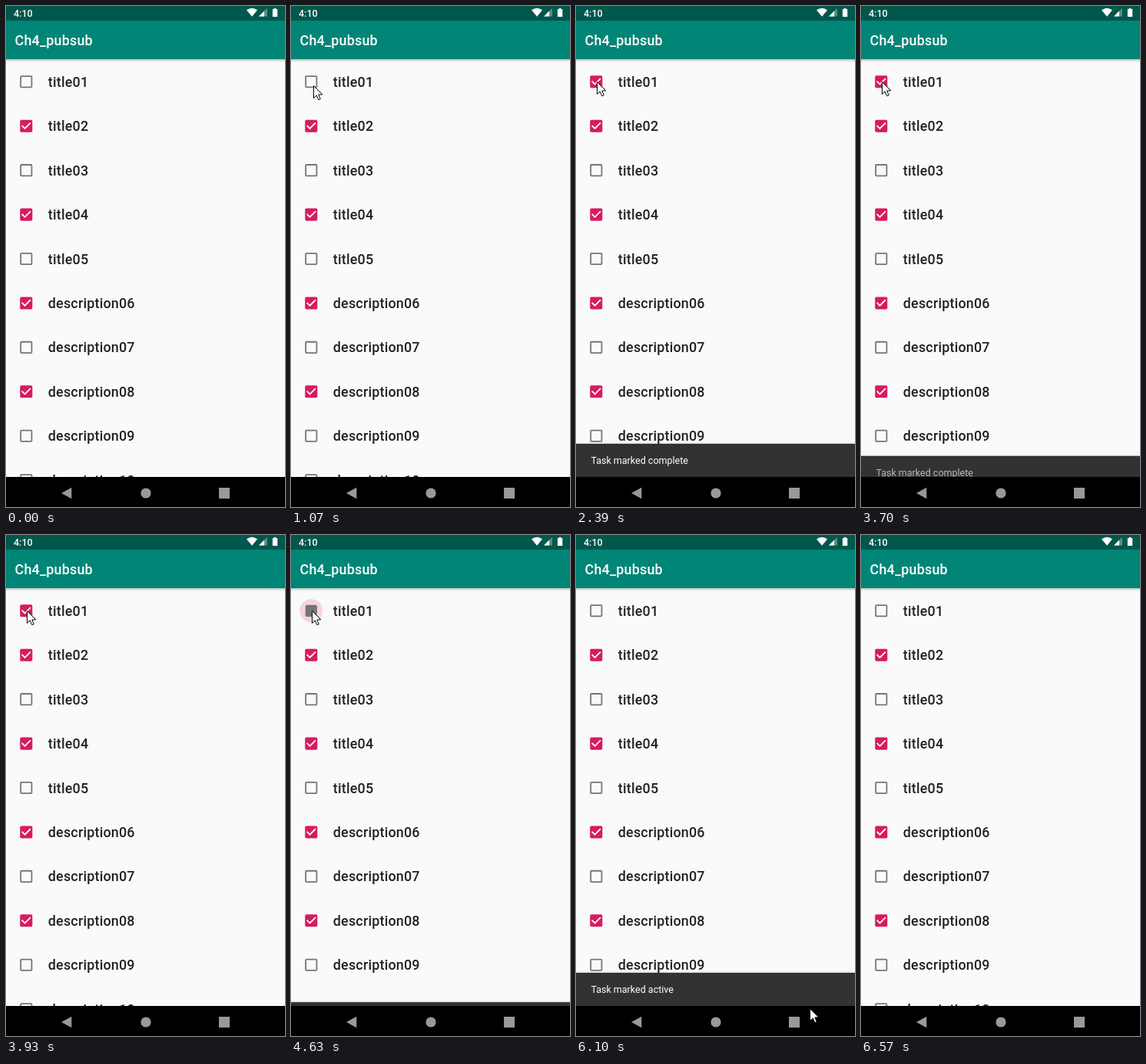
Recreate the animation shown at these times as an HTML page with a canvas. Size 363 by 650 pixels, loop 7.5 s.

```html
<!DOCTYPE html>
<html lang="en">
<head>
<meta charset="utf-8">
<title>Task list</title>
<style>
html, body { margin: 0; width: 100%; height: 100%; overflow: hidden; background: #fafafa; }
canvas { display: block; }
</style>
</head>
<body>
<canvas id="stage" width="363" height="650"></canvas>
<script>
const ctx = document.getElementById('stage').getContext('2d');
const LOOP = 7500, W = 363, NAV = 611;
const PINK = [216, 27, 96], GREY = [117, 117, 117];
const ROW0 = 98.3, PITCH = 57.43, BOX_X = 26.3, UNIT = 0.893;
const CHECK_AT = 1825, UNCHECK_AT = 4568;

// Bursts of screen updates: start, end, number of updates.
const bursts = [
  [140, 370, 4], [690, 1300, 9], [1530, 1610, 2], [1840, 2390, 8],
  [3700, 3930, 4], [4410, 5020, 9], [5630, 6170, 8], [6340, 6570, 4]
];

// Pointer paths: visible from, visible until, then [time, x, y] points.
const pointerPaths = [
  [140, 370, [[140, 250, 615], [217, 186, 410], [293, 103, 179]]],
  [690, 6170, [
    [690, 45, 21], [843, 39, 62], [995, 31, 97], [1071, 29, 103], [1147, 26, 99],
    [1300, 19, 90], [1450, 19, 90], [1610, 27, 98], [5560, 27, 98],
    [5707, 47, 130], [5861, 122, 268], [6015, 237, 488], [6093, 304, 614]
  ]]
];

const snacks = [
  ['Task marked complete', 1825, 3625],
  ['Task marked active', 4592, 6265]
];

const clamp = v => Math.max(0, Math.min(1, v));
const ramp = (t, a, b) => clamp((t - a) / (b - a));
const lerp = (a, b, p) => a + (b - a) * p;
const mix = (a, b, p) => `rgb(${a.map((v, i) => Math.round(lerp(v, b[i], p)))})`;

// Cubic bezier (.4, 0, .2, 1)
function ease(x) {
  if (x <= 0 || x >= 1) return clamp(x);
  let lo = 0, hi = 1, s = 0.5;
  for (let i = 0; i < 20; i++) {
    s = (lo + hi) / 2;
    const bx = 1.2 * s * (1 - s) ** 2 + 0.6 * s * s * (1 - s) + s ** 3;
    if (bx < x) lo = s; else hi = s;
  }
  return 3 * s * s * (1 - s) + s ** 3;
}

// Time of the latest screen update.
function held(t) {
  let out = 0;
  for (const [start, end, n] of bursts) {
    if (t < start) break;
    const step = (end - start) / (n - 1);
    const k = Math.min(n - 1, Math.floor((t - start + 9) / step));
    out = start + k * step;
  }
  return out;
}

function rect(x, y, w, h, color) {
  ctx.fillStyle = color;
  ctx.fillRect(x, y, w, h);
}

function disc(x, y, r, color) {
  ctx.fillStyle = color;
  ctx.beginPath();
  ctx.arc(x, y, r, 0, 2 * Math.PI);
  ctx.fill();
}

function poly(points, color) {
  ctx.beginPath();
  points.forEach(([x, y]) => ctx.lineTo(x, y));
  ctx.closePath();
  ctx.fillStyle = color;
  ctx.fill();
}

function text(str, x, y, size, weight, color, spacing = 0) {
  ctx.font = `${weight} ${size}px Roboto, sans-serif`;
  ctx.letterSpacing = spacing + 'px';
  ctx.fillStyle = color;
  ctx.fillText(str, x, y);
}

// open: size of the hollow, mark: size of the tick
function checkbox(y, color, open, mark, scale = 1) {
  ctx.save();
  ctx.translate(BOX_X, y);
  ctx.scale(UNIT * scale, UNIT * scale);
  ctx.fillStyle = color;
  ctx.beginPath();
  ctx.roundRect(-9, -9, 18, 18, 2);
  if (open > 0) ctx.rect(-7 * open, -7 * open, 14 * open, 14 * open);
  ctx.fill('evenodd');
  if (mark > 0) {
    ctx.scale(mark, mark);
    ctx.beginPath();
    ctx.moveTo(-6.3, -0.7);
    ctx.lineTo(-2, 3.6);
    ctx.lineTo(6.3, -4.7);
    ctx.strokeStyle = '#fff';
    ctx.lineWidth = 2;
    ctx.stroke();
  }
  ctx.restore();
}

function firstBox(t) {
  const on = t - CHECK_AT, off = t - UNCHECK_AT;
  const dip = p => 1 - 0.09 * Math.sin(Math.PI * clamp(p / 340));
  if (off >= 0) {
    checkbox(ROW0, mix(PINK, GREY, ramp(off, 0, 60)),
      ease(ramp(off, 90, 300)), 1 - 0.9 * ramp(off, 0, 70) - 0.1 * ramp(off, 70, 110), dip(off));
  } else {
    checkbox(ROW0, mix(GREY, PINK, ramp(on, 20, 120)),
      1 - ease(ramp(on, 0, 150)), ease(ramp(on, 175, 370)), dip(on));
  }
}

function ripples(t) {
  if (t >= 1840 && t < 2390) {
    const r = lerp(6, 18, ramp(t, 1825, 1985));
    disc(BOX_X, ROW0, r, `rgba(0,0,0,${0.11 * (1 - ramp(t, 2060, 2390))})`);
  }
  if (t >= 4410 && t < 5020) {
    const r = lerp(5, 18, ramp(t, 4400, 4710));
    disc(BOX_X, ROW0, r, `rgba(216,27,96,${0.16 * (1 - ramp(t, 4700, 5000))})`);
  }
}

function list(t) {
  ripples(t);
  for (let i = 0; i < 10; i++) {
    const y = ROW0 + i * PITCH;
    const label = (i < 5 ? 'title' : 'description') + String(i + 1).padStart(2, '0');
    if (i === 0) firstBox(t);
    else if ([1, 3, 5, 7].includes(i)) checkbox(y, mix(PINK, PINK, 0), 0, 1);
    else checkbox(y, mix(GREY, GREY, 0), 1, 0);
    text(label, 54.8, y + 6.6, 17.86, 500, '#212121', 0.22);
  }
}

function bars() {
  rect(0, 0, W, 19, '#00574b');
  rect(0, 19, W, 50, '#008577');
  const shade = ctx.createLinearGradient(0, 69, 0, 73);
  shade.addColorStop(0, 'rgba(0,0,0,.22)');
  shade.addColorStop(1, 'rgba(0,0,0,0)');
  rect(0, 69, W, 4, shade);
  text('4:10', 10, 13.6, 12.5, 500, '#fff');
  text('Ch4_pubsub', 11.6, 51, 17.86, 500, '#fff', 0.22);

  ctx.fillStyle = '#fff';
  ctx.beginPath();
  ctx.moveTo(320, 13.8);
  ctx.lineTo(313, 5.2);
  ctx.quadraticCurveTo(320, 0.2, 327, 5.2);
  ctx.fill();
  poly([[329, 13.5], [339.8, 13.5], [339.8, 2.8]], 'rgba(255,255,255,.35)');
  poly([[329, 13.5], [336, 13.5], [336, 6.6]], '#fff');
  rect(346.8, 4, 6.4, 10, '#fff');
  rect(348.7, 2.8, 2.6, 1.4, '#fff');
}

function snackbar(t) {
  for (const [msg, show, hide] of snacks) {
    const leave = ease(ramp(t, hide, hide + 250));
    if (t < show || leave >= 1) continue;
    const top = NAV - 43 * (ease(ramp(t, show, show + 250)) - leave);
    ctx.save();
    ctx.shadowColor = 'rgba(0,0,0,.3)';
    ctx.shadowBlur = 3;
    rect(0, top, W, 50, '#323232');
    ctx.restore();
    const alpha = ramp(t, show + 95, show + 250) * (1 - ramp(t, hide, hide + 215));
    text(msg, 19.4, top + 26.3, 12.5, 400, `rgba(255,255,255,${alpha})`);
  }
}

function navbar() {
  rect(0, NAV, W, 39, '#000');
  poly([[72, 632], [85.3, 624.7], [85.3, 639.3]], '#999');
  disc(182, 632, 6.6, '#999');
  rect(277, 625, 14, 14, '#999');
}

function pointer(t) {
  for (const [from, until, pts] of pointerPaths) {
    if (t < from || t >= until) continue;
    let i = 1;
    while (i < pts.length - 1 && t > pts[i][0]) i++;
    const a = pts[i - 1], b = pts[i], p = ramp(t, a[0], b[0]);
    ctx.save();
    ctx.translate(Math.round(lerp(a[1], b[1], p)) + 0.5, Math.round(lerp(a[2], b[2], p)) + 0.5);
    poly([[0, 0], [0, 16], [3.7, 12.4], [6.3, 18.2], [8.8, 17.2], [6.3, 11.5], [11.3, 11.3]], '#fff');
    ctx.strokeStyle = '#000';
    ctx.lineWidth = 1;
    ctx.stroke();
    ctx.restore();
  }
}

function draw(t) {
  rect(0, 0, W, 650, '#fafafa');
  list(t);
  bars();
  snackbar(t);
  navbar();
  pointer(t);
}

const origin = performance.now();
function tick() {
  draw(held((performance.now() - origin) % LOOP));
  requestAnimationFrame(tick);
}
tick();
</script>
</body>
</html>
```
